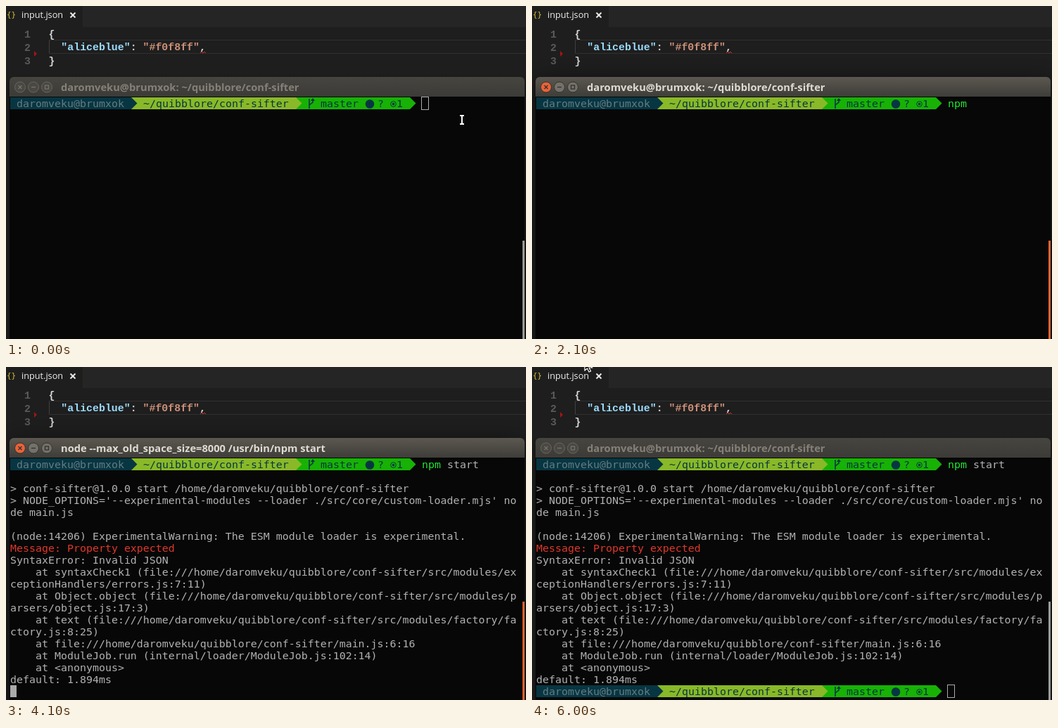
Write an HTML page with a canvas that moves like this. It is 739 by 474 pixels and loops after 6.1 s.

```html
<!DOCTYPE html>
<html lang="en">
<head>
<meta charset="utf-8">
<title>Terminal run</title>
<style>
  html, body { margin: 0; width: 100%; height: 100%; overflow: hidden; background: #1e1e1e; }
  canvas { display: block; }
</style>
</head>
<body>
<canvas id="stage" width="739" height="474"></canvas>
<script>
const ctx = document.getElementById('stage').getContext('2d');
const LOOP = 6100, CELL = 9, ROW = 17, LEFT = 6, TOP = 130;
const MONO = '14.95px "DejaVu Sans Mono", monospace';
const ICON = '11px "DejaVu Sans Mono", monospace';
const CODE = 'bold 14.9px "Liberation Mono", monospace';
const TITLE = 'bold 14.7px "Open Sans", sans-serif';
const TAB = '12.7px "Open Sans", sans-serif';
const GREY = '#b2b2b2', RED = '#e0382b', GREEN = '#22e632', TEAL = '#073642';

const user = 'daromveku', host = 'brumxok', project = 'conf-sifter';
const folder = 'quibblore/' + project;
const home = '/home/' + user + '/' + folder;
const shellTitle = `${user}@${host}: ~/${folder}`;
const command = 'npm start';
const keyTimes = [1100, 1200, 1300, 1500, 2200, 2600, 2800, 2900, 3100];
const blinks = [[900, 1100], [2100, 2200], [5000, 5600]];
const output = [
  '',
  `> ${project}@1.0.0 start ${home}`,
  "> NODE_OPTIONS='--experimental-modules --loader ./src/core/custom-loader.mjs' node main.js",
  '',
  '(node:14206) ExperimentalWarning: The ESM module loader is experimental.',
  'Message: Property expected',
  'SyntaxError: Invalid JSON',
  `    at syntaxCheck1 (file://${home}/src/modules/exceptionHandlers/errors.js:7:11)`,
  `    at Object.object (file://${home}/src/modules/parsers/object.js:17:3)`,
  `    at text (file://${home}/src/modules/factory/factory.js:8:25)`,
  `    at file://${home}/main.js:6:16`,
  '    at ModuleJob.run (internal/loader/ModuleJob.js:102:14)',
  '    at <anonymous>',
  'default: 1.894ms'
].flatMap(line => line.match(/.{1,80}/g) || ['']);

// time, x, y
const pointerPath = [
  [0, 648, 162], [200, 640, 198], [1099, 640, 198],
  [4900, 614, 190], [5100, 538, 55], [5200, 538, 55],
  [5700, 83, -7], [5800, 83, -7], [5900, 75, -10], [LOOP, 75, -10]
];

const between = (t, from, to) => t >= from && t < to;

function rect(x, y, w, h, color) {
  ctx.fillStyle = color;
  ctx.fillRect(x, y, w, h);
}

// Draws a run of text and returns the x where it ends.
function text(str, x, y, color, font = MONO) {
  ctx.font = font;
  ctx.fillStyle = color;
  ctx.fillText(str, x, y);
  return x + ctx.measureText(str).width;
}

function poly(points, fill) {
  ctx.beginPath();
  points.forEach(([x, y]) => ctx.lineTo(x, y));
  ctx.closePath();
  ctx.fillStyle = fill;
  ctx.fill();
}

function line(points, color, width = 1) {
  ctx.beginPath();
  points.forEach(([x, y]) => ctx.lineTo(x, y));
  ctx.strokeStyle = color;
  ctx.lineWidth = width;
  ctx.stroke();
}

function circle(x, y, r, fill, stroke) {
  ctx.beginPath();
  ctx.arc(x, y, r, 0, Math.PI * 2);
  if (fill) { ctx.fillStyle = fill; ctx.fill(); }
  if (stroke) { ctx.strokeStyle = stroke; ctx.lineWidth = 1; ctx.stroke(); }
}

const col = n => LEFT + n * CELL;
const rowTop = n => TOP + n * ROW;
const cellText = (str, c, r, color) => text(str, col(c), rowTop(r) + 14, color);

function cross(x, y, r, color, width) {
  line([[x - r, y - r], [x + r, y + r]], color, width);
  line([[x - r, y + r], [x + r, y - r]], color, width);
}

function drawEditor() {
  rect(0, 0, 739, 474, '#1e1e1e');
  rect(109, 0, 630, 30, '#252526');
  text('{}', 1, 16, '#d8c03a', ICON);
  text('input.json', 22, 17, '#f0f0f0', TAB);
  cross(95, 13, 3.5, '#e8e8e8', 2);
  rect(61, 48, 678, 1, '#303030');
  rect(61, 67, 678, 1, '#303030');
  rect(61, 49, 1, 18, '#404040');
  [1, 2, 3].forEach(n => text(n, 26, 26 + n * 19, '#5a5a5a', CODE));
  text('{', 60.5, 45, '#d4d4d4', CODE);
  [['  "aliceblue"', '#9cdcfe'], [': ', '#d4d4d4'], ['"#f0f8ff"', '#ce9178'], [',', '#d4d4d4']]
    .reduce((x, [str, color]) => text(str, x, 63, color, CODE), 60.5);
  text('}', 60.5, 83, '#d4d4d4', CODE);
  line([[276, 67], [278, 65], [280, 67], [282, 65], [284, 67]], '#c33');
  poly([[40, 64], [44, 68], [40, 72]], '#a31515');
}

function drawShadow(focused) {
  ctx.save();
  ctx.shadowColor = focused ? 'rgba(0,0,0,.6)' : 'rgba(0,0,0,.4)';
  ctx.shadowBlur = focused ? 36 : 12;
  ctx.shadowOffsetY = 4;
  rect(5, 105, 732, 400, '#070707');
  ctx.restore();
}

function drawTitleBar(title, focused) {
  const shade = ctx.createLinearGradient(0, 101, 0, 129);
  shade.addColorStop(0, focused ? '#5c5850' : '#474540');
  shade.addColorStop(1, focused ? '#3e3d39' : '#3c3b37');
  ctx.beginPath();
  ctx.roundRect(5, 101, 732, 28, [6, 6, 0, 0]);
  ctx.fillStyle = shade;
  ctx.fill();
  const glyph = focused ? '#33322e' : '#76726a';
  const face = focused ? '#74716a' : '#4a4843';
  const edge = focused ? '#33322e' : '#6a675f';
  circle(20, 115.5, 7.5, focused ? '#ea6237' : face, edge);
  circle(39, 115.5, 7.5, face, edge);
  circle(58, 115.5, 7.5, face, edge);
  cross(20, 115.5, 2.5, glyph, 1.3);
  line([[36, 115.5], [42, 115.5]], glyph, 1.3);
  ctx.strokeRect(55.5, 113, 5, 5);
  text(title, 78, 121, focused ? '#dfdbd2' : '#858078', TITLE);
}

function drawPrompt(r) {
  const y = rowTop(r), mid = y + ROW / 2;
  const segment = (from, to, color) => {
    const end = col(to) + 1;
    rect(col(from), y, end - col(from), ROW, color);
    poly([[end, y], [end + 8.5, mid], [end, y + ROW]], color);
  };
  segment(45, 63, '#17b205');
  segment(19, 45, '#89b928');
  segment(0, 19, TEAL);
  cellText(`${user}@${host}`, 1, r, '#657b83');
  cellText(`~/${folder}`, 21, r, TEAL);
  const x = col(47);
  line([[x + 2, y + 2], [x + 2, y + 16]], TEAL, 1.6);
  line([[x + 7, y + 3], [x + 7, y + 7], [x + 2, y + 11]], TEAL, 1.6);
  poly([[x + 4, y + 5], [x + 7, y + 1], [x + 10, y + 5]], TEAL);
  cellText('master', 49, r, TEAL);
  circle(517, y + 9.5, 6.3, TEAL);
  cellText('?', 58, r, TEAL);
  circle(550.5, y + 9.5, 3.8, null, TEAL);
  circle(550.5, y + 9.5, 1.8, TEAL);
  cellText('1', 61, r, TEAL);
}

function drawCursor(c, r, focused) {
  if (focused) return rect(col(c), rowTop(r), CELL, ROW, '#aaaaaa');
  ctx.strokeStyle = '#aaaaaa';
  ctx.lineWidth = 1;
  ctx.strokeRect(col(c) - 0.5, rowTop(r) - 0.5, CELL + 1, ROW + 1);
}

function drawTerminal(t, focused) {
  rect(5, 129, 732, 345, '#070707');
  drawPrompt(0);
  const typed = keyTimes.filter(k => t >= k).length;
  cellText(command.slice(0, Math.min(typed, 3)), 65, 0, typed < 3 ? RED : GREEN);
  cellText(command.slice(4, Math.max(typed, 4)), 69, 0, GREY);
  if (between(t, 2300, 2600)) rect(col(69), TOP + 15, CELL, 1, GREY);
  if (t >= 4100) output.forEach((str, i) =>
    cellText(str, 0, i + 1, str.startsWith('Message') ? RED : GREY));
  if (t >= 4300) drawPrompt(19);

  if (!blinks.some(([from, to]) => between(t, from, to))) {
    const [c, r] = t < 3600 ? [65 + typed, 0] : t < 4100 ? [0, 1] : t < 4300 ? [0, 19] : [65, 19];
    drawCursor(c, r, focused);
  }
  rect(734, 334, 3, 140, between(t, 400, 6000) ? '#e0622f' : '#9a9a98');
}

function drawPointer(t) {
  if (between(t, 1100, 4900)) return;
  const i = pointerPath.findIndex(p => p[0] > t);
  const [t0, x0, y0] = pointerPath[i - 1], [t1, x1, y1] = pointerPath[i];
  const k = (t - t0) / (t1 - t0);
  const x = Math.round(x0 + (x1 - x0) * k), y = Math.round(y0 + (y1 - y0) * k);
  ctx.save();
  ctx.translate(x, y);
  if (y < 30 || between(y, 101, 129)) {
    const arrow = [[0, 0], [0, 15], [3.5, 12], [6, 17], [8.5, 16], [6, 11], [10.5, 11]];
    poly(arrow, '#000');
    line([...arrow, [0, 0]], '#fff', 1.2);
  } else {
    const beam = (color, grow) => {
      rect(-1 - grow, -7 - grow, 2 + 2 * grow, 14 + 2 * grow, color);
      for (const end of [-7, 5]) rect(-3 - grow, end - grow, 6 + 2 * grow, 2 + 2 * grow, color);
    };
    beam('#000', 1);
    beam('#fff', 0);
  }
  ctx.restore();
}

function frame() {
  const t = Math.floor(performance.now() % LOOP / 100) * 100;
  const focused = between(t, 300, 5900);
  const running = between(t, 3700, 4200);
  drawEditor();
  drawShadow(focused);
  drawTitleBar(running ? 'node --max_old_space_size=8000 /usr/bin/npm start' : shellTitle, focused);
  drawTerminal(t, focused);
  drawPointer(t);
  requestAnimationFrame(frame);
}
frame();
</script>
</body>
</html>
```
